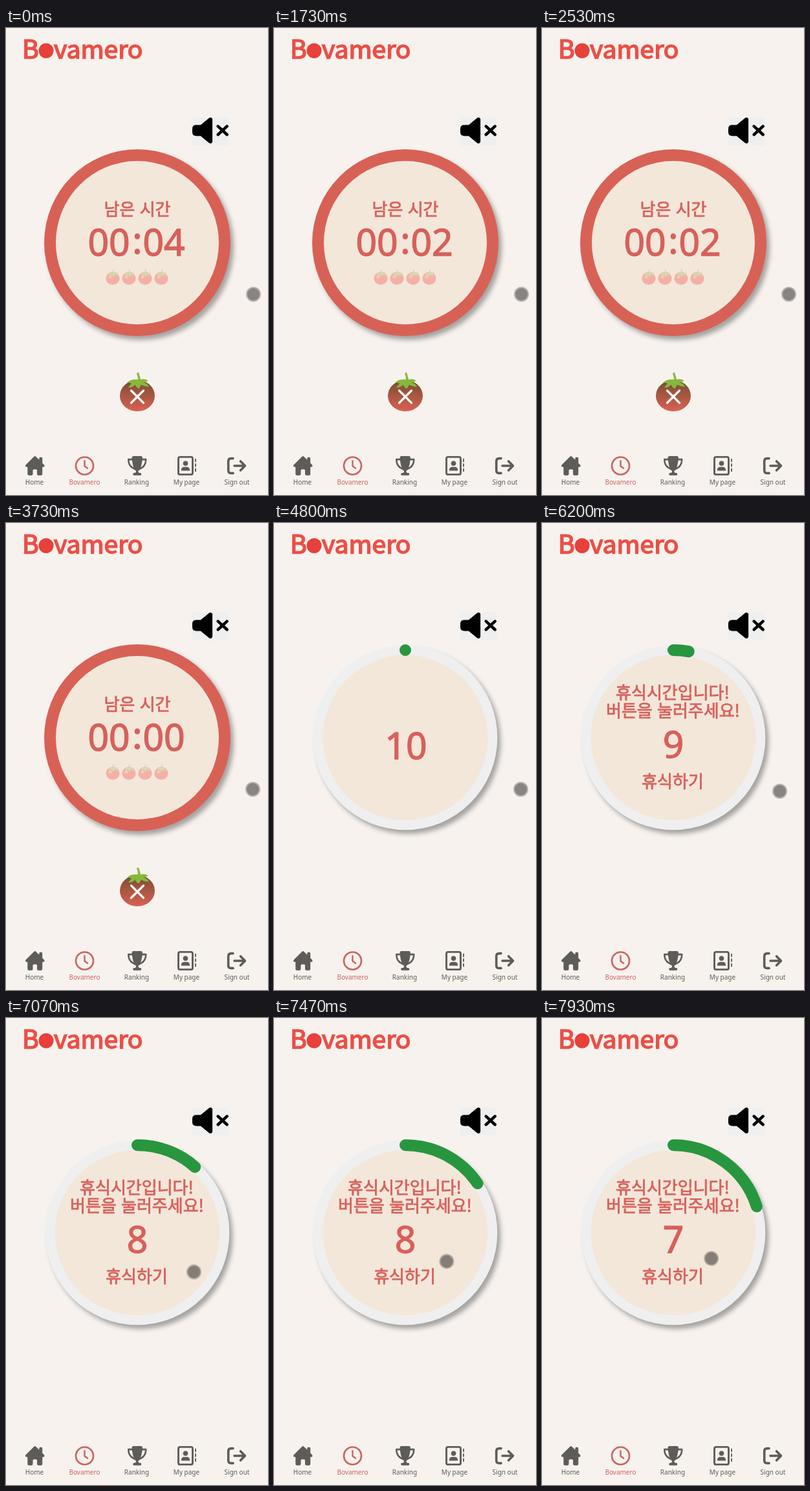
Write an HTML page that moves like this. It is 405 px wide and 720 px high and loops after 8000 ms.

```html
<!DOCTYPE html>
<html lang="ko">
<head>
<meta charset="utf-8">
<title>Timer</title>
<style>
html, body { margin: 0; height: 100%; overflow: hidden; background: #f7f2ee; }
svg { display: block; width: 100vw; height: 100vh; }
text { font-family: "Noto Sans", "Open Sans", sans-serif; }
.ko { font: 26px "Noto Sans CJK KR", "Noto Sans CJK", sans-serif; stroke-width: .8; }
.logo { font: 39px "Noto Sans CJK KR", "Noto Sans", sans-serif; fill: #ec4f46; stroke: #ec4f46; stroke-width: 1.7; }
.num { font-size: 57px; stroke-width: 1.3; }
.dial { fill: #d8605a; stroke: #d8605a; text-anchor: middle; }
.shadow { filter: drop-shadow(5px 6px 3.5px rgba(0, 0, 0, .33)); }
.nav { font-size: 10px; text-anchor: middle; }
.line { fill: none; stroke-linecap: round; stroke-linejoin: round; }
</style>
</head>
<body>
<svg viewBox="0 0 405 720">
  <defs>
    <linearGradient id="brown" x2="0" y2="1">
      <stop offset=".1" stop-color="#7f5035"/>
      <stop offset="1" stop-color="#db6053"/>
    </linearGradient>
    <path id="leaf" d="M-1-36L2-37Q4-31 5-26Q12-28 17-24Q13-22 10-22Q16-19 18-15Q11-15 6-18Q4-14 2-12Q-2-14-3-18Q-8-13-14-14Q-11-17-9-20Q-13-22-16-21Q-11-27 1-26Q1-31-1-36Z"/>
    <g id="mini">
      <ellipse cy="1" rx="10.6" ry="10" fill="#f4b0a6"/>
      <ellipse cx="-4" cy="-1" rx="3" ry="2" fill="#f8c6bd"/>
      <use href="#leaf" transform="translate(0 4) scale(.46)" fill="#d4d9b0"/>
    </g>
  </defs>
  <rect width="405" height="720" fill="#f7f2ee"/>

  <text class="logo" x="25" y="47">B</text>
  <circle cx="62" cy="35" r="11.5" fill="#e8403a"/>
  <text class="logo" x="74" y="47">vamero</text>

  <rect x="288" y="138" width="56" height="43" fill="#efefef"/>
  <g transform="translate(288 135.1) scale(.0972 .0893)">
    <path d="M301 35Q320 44 320 64V448Q320 468 301 477Q283 485 267 472L132 352H64Q0 352 0 288V224Q0 160 64 160H132L267 40Q283 27 301 35Z"/>
    <path class="line" d="M408 184L552 328M552 184L408 328" stroke="#000" stroke-width="48"/>
  </g>

  <g id="work">
    <circle class="shadow" cx="203" cy="331" r="144" fill="#d86156"/>
    <circle cx="203" cy="331" r="126" fill="#f3e7da"/>
    <g class="dial">
      <text class="ko" x="203" y="289">남은 시간</text>
      <text class="num" x="159" y="351">00</text>
      <text class="num" x="203" y="348">:</text>
      <text class="num" x="244" y="351" id="secs"></text>
    </g>
    <use href="#mini" x="165" y="385"/><use href="#mini" x="190" y="385"/>
    <use href="#mini" x="215" y="385"/><use href="#mini" x="240" y="385"/>
    <ellipse cx="203" cy="567" rx="27" ry="24" fill="url(#brown)"/>
    <use href="#leaf" x="203" y="568" fill="#86b93b"/>
    <path class="line" d="M193.5 559L212.5 578M212.5 559L193.5 578" stroke="#fff" stroke-width="3.2"/>
  </g>

  <g id="rest">
    <circle class="shadow" cx="203" cy="331" r="142.3" fill="#efefef"/>
    <circle cx="203" cy="331" r="127.5" fill="#f3e7da"/>
    <circle id="arc" class="line" cx="203" cy="331" r="135" pathLength="360" stroke="#28963f" stroke-width="18" transform="rotate(-90 203 331)"/>
    <g class="dial">
      <text class="num" id="count"></text>
      <g id="hint">
        <text class="ko" x="202" y="270.5">휴식시간입니다!</text>
        <text class="ko" x="202.5" y="299">버튼을 눌러주세요!</text>
        <text class="ko" x="202" y="407.5">휴식하기</text>
      </g>
    </g>
  </g>

  <g fill="#5e5c58" stroke="#5e5c58" stroke-width="0">
    <path transform="translate(30 660) scale(.0512 .0582)" d="M544 288Q576 288 576 256Q575 242 565 232L512 185V64Q512 32 480 32H448Q416 32 416 64V100L310 8Q288-8 266 8L10 232Q0 242 0 256Q0 288 32 288H64V472Q64 512 104 512H184Q224 512 224 472V384Q224 352 256 352H320Q352 352 352 384V472Q352 512 392 512H472Q512 512 512 472V288Z"/>
    <text class="nav" x="44" y="704">Home</text>

    <g transform="translate(188 660) scale(.0512 .0582)">
      <path d="M176 0H400Q447 2 447 48Q438 250 359 365Q320 378 320 410Q324 446 358 448H384Q416 450 416 480Q416 510 384 512H192Q160 510 160 480Q160 450 192 448H218Q252 446 256 410Q256 378 217 365Q138 250 129 48Q129 2 176 0Z"/>
      <path class="line" d="M140 88H24Q24 290 235 345M436 88H552Q552 290 341 345" stroke-width="48"/>
    </g>
    <text class="nav" x="202" y="704">Ranking</text>

    <rect class="line" x="266.5" y="661.4" width="22" height="27" rx="2.5" stroke-width="2.9"/>
    <circle cx="277.5" cy="671.2" r="3.8"/>
    <path d="M270.8 682.4Q270.8 676.8 275.5 676.8H279.5Q284.2 676.8 284.2 682.4Z"/>
    <path class="line" d="M293 664.7V668.3M293 672.2V675.8M293 679.6V683.2" stroke-width="1.9"/>
    <text class="nav" x="279" y="704">My page</text>

    <path class="line" d="M351 663.6H348Q343.7 663.6 343.7 668V682Q343.7 686.4 348 686.4H351M353 675H369M362.5 668L369.5 675L362.5 682" stroke-width="3.6"/>
    <text class="nav" x="357" y="704">Sign out</text>
  </g>
  <g fill="#cc655f">
    <circle class="line" cx="121.5" cy="675" r="13.5" stroke="#cc655f" stroke-width="2.7"/>
    <path class="line" d="M121.5 667.5V675.5L126 678.7" stroke="#cc655f" stroke-width="2.5"/>
    <text class="nav" x="121.5" y="704">Bovamero</text>
  </g>

  <g id="touch">
    <circle r="11.5" fill-opacity=".26"/>
    <circle r="9.5" fill-opacity=".26"/>
  </g>
</svg>
<script>
const $ = id => document.getElementById(id);
const FRAME = 1000 / 15, REST = 4800, RUN = 5918;

// time, x, y of the touch dot
const path = [
  [0, 382.5, 410.5], [1800, 382.5, 410.5], [2530, 381.5, 410.5],
  [5260, 381.5, 410.5], [5330, 380.5, 410.5], [5600, 380.5, 410.5],
  [5660, 367.5, 413.5], [6200, 367.5, 413.5], [6667, 328.5, 413.5],
  [7067, 290.5, 391.5], [7533, 263, 372.5], [8000, 261.5, 370.5]
];

function touchAt(t) {
  const i = path.findIndex(p => p[0] > t);
  const [a, b] = [path[i - 1], path[i]];
  const k = (t - a[0]) / (b[0] - a[0]);
  return [a[1] + (b[1] - a[1]) * k, a[2] + (b[2] - a[2]) * k];
}

const show = (id, on) => $(id).setAttribute('display', on ? 'inline' : 'none');

function draw(now) {
  // the picture advances 15 times a second
  const t = Math.floor((now % 8000) / FRAME + .1) * FRAME % 8000;
  show('work', t < REST - 5);
  show('rest', t >= REST - 5);

  const left = 4 - [730, 1730, 2930, 3730].filter(s => t >= s - 5).length;
  $('secs').textContent = '0' + left;

  const run = Math.max(0, t - RUN) / 1000;
  $('arc').setAttribute('stroke-dasharray', `${Math.max(.01, run * 36)} 720`);
  const hint = t >= 4865, count = $('count');
  show('hint', hint);
  count.textContent = t < 5865 ? 10 : 9 - Math.floor(run);
  count.setAttribute('x', t < 5865 ? 204 : 203);
  count.setAttribute('y', hint ? 362 : 364);

  show('touch', t < 5465 || t >= 5665);
  $('touch').setAttribute('transform', `translate(${touchAt(t)})`);
}

function loop() {
  draw(performance.now());
  requestAnimationFrame(loop);
}
loop();
</script>
</body>
</html>
```
